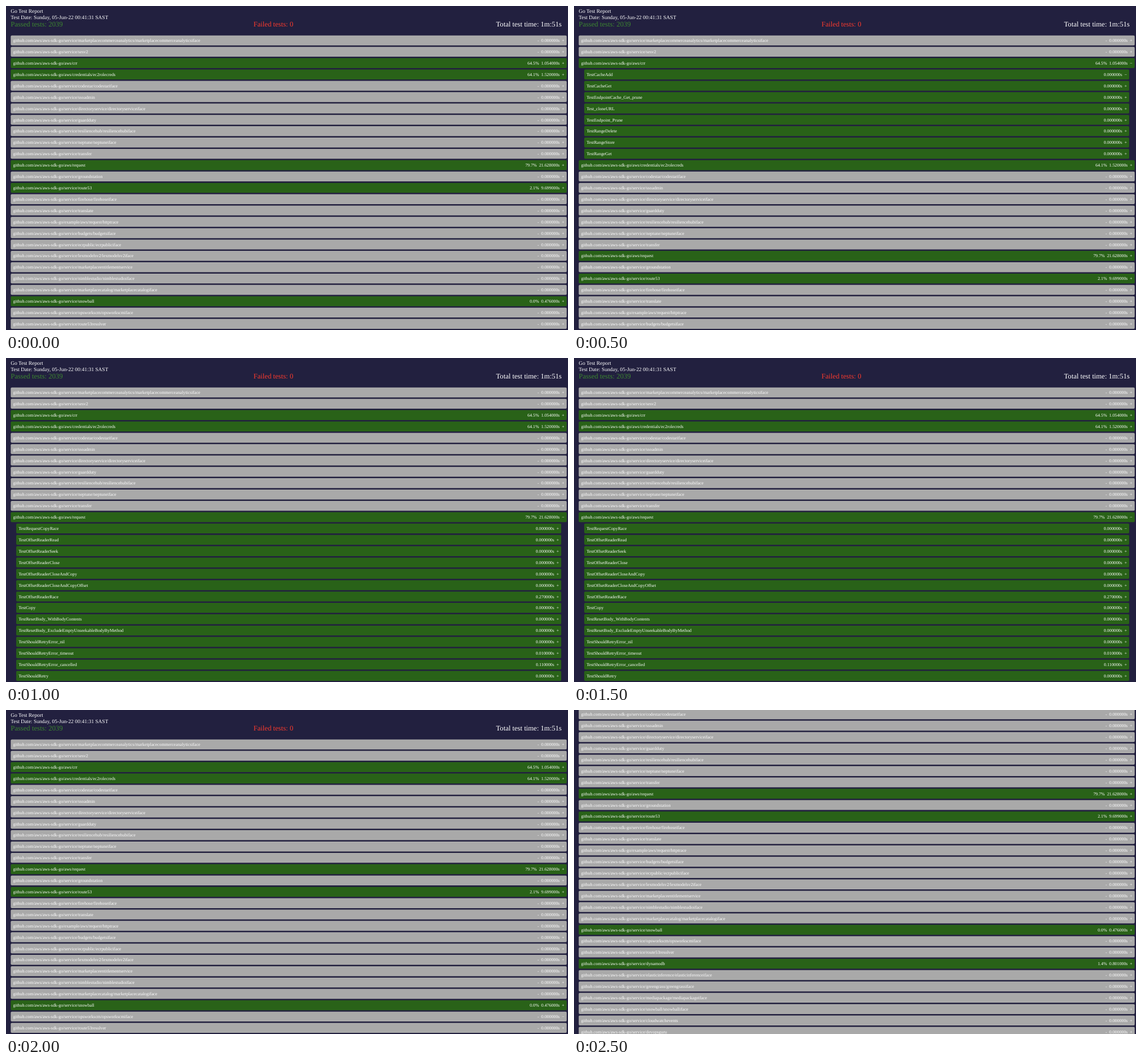
These frames come from a looping animation (985x569 px, 3 s). An HTML page:

```html
<!DOCTYPE html>
<html lang="en">
<head>
<meta charset="utf-8">
<title>Go Test Report</title>
<style>
  html, body { margin: 0; width: 100%; height: 100%; overflow: hidden; background: #22203f; }
  svg {
    position: absolute; left: 0; top: 0; width: 985px; height: 569px;
    background: #22203f; visibility: hidden;
    font: 7.8px "Liberation Serif", Times, serif; fill: #fff;
    text-rendering: geometricPrecision;
    animation: show 3s step-end infinite;
  }
  text { white-space: pre; }
  .end { text-anchor: end; }
  .title { font-size: 9.36px; }
  .total { font-size: 12.55px; }
  .passed { fill: #3c8630; }
  .failed { fill: #f93a2d; }
  .skip { fill: #a9a9a9; }
  .pass { fill: #296218; }
  @keyframes show {
    0% { visibility: visible; }
    16.666%, 100% { visibility: hidden; }
  }
</style>
</head>
<body>
<script>
const PITCH = 19.91, TOP = 51.8, HEIGHT = 17.4;
const PLUS = "+", MINUS = "\u2212";

// Each package: path, then coverage and time if it has tests.
const packages = `service/marketplacecommerceanalytics/marketplacecommerceanalyticsiface
service/sesv2
aws/crr 64.5% 1.054
aws/credentials/ec2rolecreds 64.1% 1.520
service/codestar/codestariface
service/ssoadmin
service/directoryservice/directoryserviceiface
service/guardduty
service/resiliencehub/resiliencehubiface
service/neptune/neptuneiface
service/transfer
aws/request 79.7% 21.628
service/groundstation
service/route53 2.1% 9.699
service/firehose/firehoseiface
service/translate
example/aws/request/httptrace
service/budgets/budgetsiface
service/ecrpublic/ecrpubliciface
service/lexmodelsv2/lexmodelsv2iface
service/marketplaceentitlementservice
service/nimblestudio/nimblestudioiface
service/marketplacecatalog/marketplacecatalogiface
service/snowball 0.0% 0.476
service/opsworkscm/opsworkscmiface
service/route53resolver
service/dynamodb 1.4% 0.801
service/elasticinference/elasticinferenceiface
service/greengrass/greengrassiface
service/mediapackage/mediapackageiface
service/snowball/snowballiface
service/cloudwatchevents
service/devopsguru`.split("\n").map(line => line.split(" "));

const tests = {
  "aws/crr": `CacheAdd CacheGet EndpointCache_Get_prune _cloneURL
    Endpoint_Prune RangeDelete RangeStore RangeGet`,
  "aws/request": `RequestCopyRace OffsetReaderRead OffsetReaderSeek
    OffsetReaderClose OffsetReaderCloseAndCopy OffsetReaderCloseAndCopyOffset
    OffsetReaderRace Copy ResetBody_WithBodyContents
    ResetBody_ExcludeEmptyUnseekableBodyByMethod ShouldRetryError_nil
    ShouldRetryError_timeout ShouldRetryError_cancelled ShouldRetry`
};
const slow = { OffsetReaderRace: 0.27, ShouldRetryError_timeout: 0.01, ShouldRetryError_cancelled: 0.11 };

const seconds = n => Number(n).toFixed(6) + "s";

const text = (x, y, str, cls = "") => `<text x="${x}" y="${y}" class="${cls}">${str}</text>`;

const header = text(8.2, 12.4, "Go Test Report", "title")
  + text(8.2, 23, "Test Date: Sunday, 05-Jun-22 00:41:31 SAST", "title")
  + text(8.2, 36.4, "Passed tests: 2039", "total passed")
  + text(433.8, 36.4, "Failed tests: 0", "total failed")
  + text(974, 36.4, "Total test time: 1m:51s", "total end");

function row(index, inset, cls, label, info) {
  const y = TOP + index * PITCH, left = 8.3 + inset, right = 982.7 - inset;
  const base = y + 11.35;
  return `<rect class="${cls}" x="${left}" y="${y}" width="${right - left}" height="${HEIGHT}" rx="2"/>`
    + text(left + 4.1, base, label) + text(right - 4, base, info, "end");
}

function list(open, firstOpen) {
  let index = 0, out = "";
  for (const [path, cover = "-", time = 0] of packages) {
    const sign = path === open || path.includes("opsworkscm") ? MINUS : PLUS;
    out += row(index++, 0, time ? "pass" : "skip", "github.com/aws/aws-sdk-go/" + path,
      `${cover}  ${seconds(time)}  ${sign}`);
    if (path !== open) continue;
    tests[path].split(/\s+/).forEach((name, i) => {
      const mark = firstOpen && i === 0 ? MINUS : PLUS;
      out += row(index++, 9.6, "pass", "Test" + name, `${seconds(slow[name] || 0)}  ${mark}`);
    });
    if (path === "aws/request") break; // the rest lies below the window
  }
  return out;
}

const views = [
  {},
  { open: "aws/crr", firstOpen: true },
  { open: "aws/request" },
  { open: "aws/request", firstOpen: true },
  {},
  { scroll: 132.5 }
];

document.body.innerHTML = views.map(({ open, firstOpen, scroll = 0 }, i) =>
  `<svg viewBox="0 0 985 569" style="animation-delay:${i * 0.5 - 3}s">
    <g transform="translate(0 ${-scroll})">${header}${list(open, firstOpen)}</g></svg>`).join("");
</script>
</body>
</html>
```
